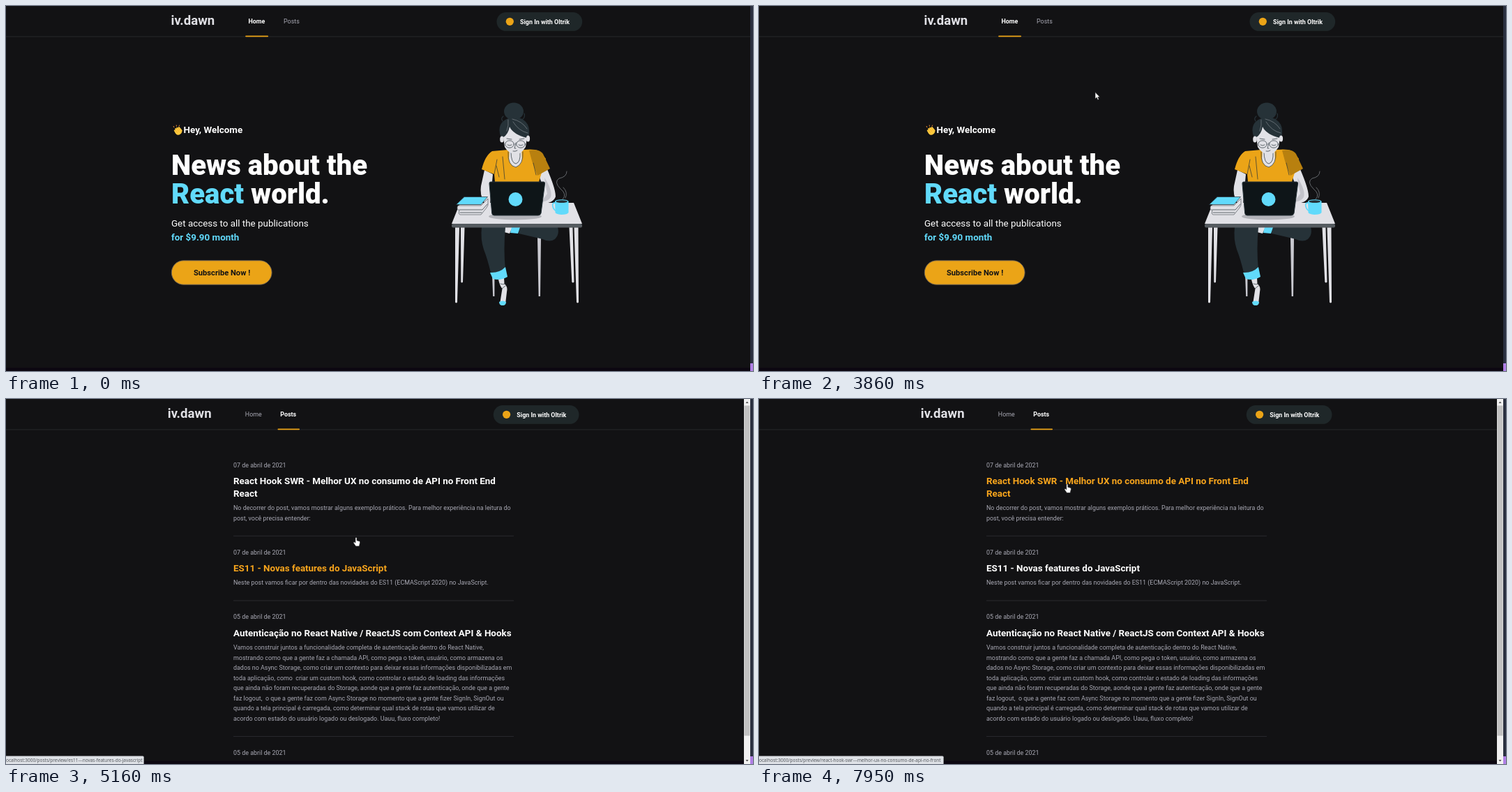
Write an HTML page that moves like this. It is 1071 by 523 pixels and loops after 8000 ms.

```html
<!DOCTYPE html>
<html lang="en">
<head>
<meta charset="utf-8">
<style>
  html, body { margin: 0; width: 100%; height: 100%; overflow: hidden; background: #121214; }
  svg { display: block; width: 1071px; height: 523px; }
  text { font: 8.92px Roboto, sans-serif; fill: #a8a8b3; white-space: pre; }
  .b { font-weight: 700; fill: #fff; }
  .brand { font-size: 18.6px; fill: #e1e1e6; }
  .mid { font-size: 13.4px; }
  .h1 { font-size: 40.15px; font-weight: 900; }
  .cyan { fill: #61dafb; }
  .url { font: 6.5px "Open Sans", sans-serif; fill: #4d5156; }
  .dark { fill: #263238; }
  .skin { fill: #e1e1e6; }
  .gold { fill: #eba417; }
  .line { fill: none; stroke: #263238; stroke-width: .7; stroke-linecap: round; }
</style>
</head>
<body>
<svg id="stage" viewBox="0 0 1071 523"></svg>
<script>
const text = (x, y, s, cls = '', id = '') =>
  `<text x="${x}" y="${y}" class="${cls}" id="${id}">${s}</text>`;
const path = (d, cls, extra = '') => `<path d="${d}" class="${cls}" ${extra}/>`;
const rect = (x, y, w, h, fill, r = 0) =>
  `<rect x="${x}" y="${y}" width="${w}" height="${h}" fill="${fill}" rx="${r}"/>`;
const oval = (x, y, rx, ry, cls, extra = '') =>
  `<ellipse cx="${x}" cy="${y}" rx="${rx}" ry="${ry}" class="${cls}" ${extra}/>`;

// Site header; dx is the shift caused by the scrollbar
const header = (dx, onPosts) => `
  ${rect(0, 43.5, 1067, .8, '#2b2c30')}
  <g transform="translate(${dx})">
    ${text(236.5, 27, 'iv.dawn', 'b brand')}
    ${text(347.5, 25.2, 'Home', onPosts ? '' : 'b')}
    ${text(398, 25.2, 'Posts', onPosts ? 'b' : '', onPosts ? '' : 'postsLink')}
    ${onPosts ? rect(394.2, 42.4, 31.5, 1.8, '#eba417', .8) : rect(343.2, 42.4, 32.8, 1.8, '#eba417', .8)}
    ${rect(703.5, 9, 122.7, 26.8, '#1f2729', 13.4)}
    ${oval(722.3, 22.3, 5.6, 5.6, 'gold')}
    ${text(737, 25.6, 'Sign In with Oltrik', 'b')}
  </g>`;

const clap = `
  <g transform="translate(246.3 178.8) rotate(-38)" fill="#ffc83d">
    <rect x="-4.8" y="-3.6" width="10" height="9.6" rx="4.4"/>
    ${[-4.4, -1.9, .6, 3.1].map((x, i) => rect(x, -5.4 + Math.abs(i - 1.4), 2.2, 8, '#ffc83d', 1.1)).join('')}
    <path d="M-2-2V2M.6-2.6V2M3-2V2" stroke="#e59a1c" stroke-width=".5"/>
  </g>
  <path d="M241 174l-1-2M244.5 172.5l-.3-2M248 172.4l.8-1.8" stroke="#f28b30" stroke-width="1"/>`;

const woman = `
  ${path('M762 332h5l-1 84h-2.4ZM697 384h3.4v32h-2.2Z', '', 'fill="#c9c9d0"')}
  ${path('M735 317H791Q794 327 787 334Q780 339 769 334L735 326Z', 'dark')}
  ${path('M714 317H726L722 326L714 324Z', 'skin')}
  ${path('M725 317H737L734 326L723 325Z', 'cyan')}
  ${path('M682 317H716Q713 348 716 378L696 386Q690 361 685 349Q680 334 682 317Z', 'dark')}
  ${path('M706 392L714 389L714.5 398Q720 402 718 410L716 427Q712 431 708 427L711.5 405Q708 401 706 392Z', 'skin')}
  ${path('M707 424Q712 421 717 424Q717 429 712 429Q707 429 707 424Z', 'cyan')}
  ${path('M709 398Q714 400 717 397M711 405L716 401', 'line')}
  ${path('M694 382Q707 383 716 374L719 388Q709 394 698 391Z', 'cyan')}
  ${path('M686 235L698 241L694 284H688Q679 275 681 258Z', 'skin')}
  ${path('M763 240L776 234Q788 262 788 273Q785 283 768 283L771 262Z', 'skin')}
  ${path('M772 246Q784 264 781 274Q776 281 768 280L776 269Z', '', 'fill="#c3c3ca"')}
  ${path('M720 206L742 206Q762 204 767 210L774 219L764 252H701L700 241L682 234Q687 214 697 208Z', 'gold')}
  ${path('M750 207Q765 204 770 212L780 233L762 243L754 222Z', '', 'fill="#b8800f"')}
  ${path('M700 241L704 220M707 245L703 229M760 242L756 225M712 216L715 248', 'line')}
  ${path('M722 204H739L740 221Q737 230 730 231Q724 229 721 221Z', 'skin')}
  ${path('M720 209Q719 229 731 231Q742 227 741 209M724 209Q724 225 731 226Q738 224 737 210', 'line')}
  ${oval(728, 151, 14, 12.5, 'dark')}
  ${path('M708 183Q704 163 728 159Q752 161 750 184L747 193L711 192Z', 'dark')}
  ${oval(711, 191, 2.8, 4.5, 'skin')}${oval(748.5, 190, 2.6, 4.5, 'skin')}
  ${path('M713 188Q720 184 722 173Q727 184 747 189L745 202Q738 213 731 213Q720 211 715 202Z', 'skin')}
  ${path('M718 179Q721 171 720 163M727 166Q735 179 748 182M726 162Q740 165 747 176', 'line', 'style="stroke:#9ea5aa;stroke-width:.5"')}
  ${path('M712 165Q709 161 713 158M740 163Q745 159 743 154', 'line', 'style="stroke-width:1.2"')}
  ${oval(722, 198, 6.3, 5.2, 'line')}${oval(738, 198, 6.3, 5.2, 'line')}
  ${path('M719 199Q722 201 725 199M735 199Q738 201 741 199M718 190L725 191M736 191L743 190M731 196L729 204H731M727 208Q730 209 733 207', 'line')}
  ${path('M651 282H814L826 312H639Z', 'skin')}
  ${rect(639, 312, 187, 5.4, '#555b60', 2)}
  ${path('M644 317.5h6l-3 107q-1.5 2-3 0ZM652 317.5h5.5l-2.5 78q-1.5 2-2.7 0ZM807.5 317.5h5l2 78q-1.8 2-3.2 0ZM814.5 317.5h6l.5 107q-1.5 2-3 0Z', 'skin')}
  ${oval(730, 301.5, 38, 5, '', 'fill="#b3b4ba"')}
  ${path('M695 252H771Q773 252 772.5 255L767 297Q766 300 763 300H700Q697 300 696.7 297L693 255Q692.5 252 695 252Z', '', 'fill="#0e1518" stroke="#263238" stroke-width="1"')}
  ${oval(730.5, 277, 10, 10, 'cyan')}
  ${path('M648 286H681L691 276V285L689 289L681 299H651Q648 298 650 293Q645 291 648 286Z', 'skin', 'stroke="#555b60" stroke-width=".7"')}
  ${path('M650 292H683L690 284M651 296H682', 'line')}
  ${path('M657 273.5H690.5L681 284.5H645.5Z', 'cyan', 'stroke="#263238" stroke-width=".7"')}
  ${path('M787 282Q782 282 784.5 289Q786 293 790 294', 'line', 'style="stroke:#61dafb;stroke-width:1.8"')}
  ${path('M787 280H806.5V296Q805 299 796 299Q788 298 787.5 296Z', 'cyan')}
  ${oval(796.7, 280, 9.8, 2.8, 'cyan')}${oval(796.7, 280.2, 8.2, 1.9, 'dark')}
  ${path('M798 277Q805 270 795 262Q785 252 793 247Q804 245 804 237M802 275Q806 267 799 260', 'line', 'style="stroke:#878b90"')}`;

const home = `
  ${header(0, false)}
  ${clap}
  ${text(254.6, 182.4, 'Hey, Welcome', 'b mid')}
  ${text(237, 242.3, 'News about the', 'b h1')}
  ${text(237, 282.5, '<tspan class="cyan">React</tspan> world.', 'b h1')}
  ${text(237, 316.4, 'Get access to all the publications', 'mid" style="fill:#fff')}
  ${text(237, 336.4, 'for $9.90 month', 'b mid cyan')}
  <rect x="237.3" y="364.8" width="143.8" height="34.4" rx="17.2" fill="#eba417" stroke="#6b6256" stroke-width=".9"/>
  ${text(269, 386.3, 'Subscribe Now !', 'b" style="font-size:11.15px;fill:#121214')}
  ${woman}`;

const para = (y, lines) => lines.map((s, i) => text(326, y + i * 14.5, s)).join('');
const rule = y => rect(326, y, 402, .7, '#323238');
const posts = `
  ${header(-4.7, true)}
  ${text(326, 97.6, '07 de abril de 2021')}
  <g id="swr">
    ${text(326, 122.2, 'React Hook SWR - Melhor UX no consumo de API no Front End', 'b mid" style="fill:inherit')}
    ${text(326, 140, 'React', 'b mid" style="fill:inherit')}
  </g>
  ${para(159.2, ['No decorrer do post, vamos mostrar alguns exemplos práticos. Para melhor experiência na leitura do',
    'post, você precisa entender:'])}
  ${rule(195.8)}
  ${text(326, 222.6, '07 de abril de 2021')}
  <g id="es11">${text(326, 247.2, 'ES11 - Novas features do JavaScript', 'b mid" style="fill:inherit')}</g>
  ${para(266.2, ['Neste post vamos ficar por dentro das novidades do ES11 (ECMAScript 2020) no JavaScript.'])}
  ${rule(288.6)}
  ${text(326, 315.4, '05 de abril de 2021')}
  ${text(326, 340, 'Autenticação no React Native / ReactJS com Context API &amp; Hooks', 'b mid')}
  ${para(359, ['Vamos construir juntos a funcionalidade completa de autenticação dentro do React Native,',
    'mostrando como que a gente faz a chamada API, como pega o token, usuário, como armazena os',
    'dados no Async Storage, como criar um contexto para deixar essas informações disponibilizadas em',
    'toda aplicação, como  criar um custom hook, como controlar o estado de loading das informações',
    'que ainda não foram recuperadas do Storage, aonde que a gente faz autenticação, onde que a gente',
    'faz logout,  o que a gente faz com Async Storage no momento que a gente fizer SignIn, SignOut ou',
    'quando a tela principal é carregada, como determinar qual stack de rotas que vamos utilizar de',
    'acordo com estado do usuário logado ou deslogado. Uauu, fluxo completo!'])}
  ${rule(483)}
  ${text(326, 509.6, '05 de abril de 2021')}
  ${rect(1058, 0, 9, 523, '#f1f1f1')}
  ${rect(1058.5, 9.5, 8, 473, '#c1c1c1')}
  ${path('M1060.5 6l2-2.5 2 2.5ZM1060.5 517l2 2.5 2-2.5Z', '', 'fill="#505050"')}`;

document.getElementById('stage').innerHTML = `
  ${rect(0, 0, 1071, 523, '#121214')}
  ${rect(0, 518.5, 1067, 5, '#0c0711')}
  <g id="home">${home}</g>
  <g id="posts">${posts}</g>
  ${rect(1067, 0, 4, 523, '#2a3040')}
  ${rect(1067, 512, 4, 11, '#b07fe6')}
  <g id="status"><rect id="statusBox" x="-2" y="511.7" height="12" rx="1.5" fill="#dee1e6" stroke="#a9abb0" stroke-width=".5"/>${text(0, 519.7, '', 'url', 'url')}</g>
  ${path('M370.2 16.8h2.4M371.4 16.8v9.8M370.2 26.6h2.4', '', 'id="ibeam" stroke="#ddd" stroke-width=".7"')}
  <g id="cursor" stroke="#1a1a1c" stroke-width=".6">
    ${path('M0 0V9.5L2.2 7.6 3.7 11 5.3 10.3 3.8 7H6.7Z', '', 'id="arrow" fill="#fff"')}
    ${path('M-1.2 1Q-.2-.4.9 1V4.8L4.6 5.8Q5.7 6.3 5.4 8L4.2 13H-.6L-3.9 8.4Q-4.2 7-2.9 6.9L-1.2 8.2Z', '', 'id="hand" fill="#fff"')}
  </g>`;

const $ = id => document.getElementById(id);
const show = (id, on) => $(id).style.display = on ? '' : 'none';
const clamp = v => Math.max(0, Math.min(1, v));

// Pointer tip: time, x, y
const track = [
  [130, 932, 402], [420, 860, 240], [700, 770, 70], [900, 722, 20], [1130, 737, 25],
  [1830, 737, 25], [2000, 803, 26], [2200, 600, 25], [2380, 300, 22], [2540, 360, 20],
  [2690, 405.5, 23], [2900, 407, 23], [3080, 440, 50], [3230, 518, 100], [3460, 482, 123.5],
  [4160, 482, 123.5], [4390, 484, 196], [4550, 477, 240], [4780, 443, 228],
  [5010, 470, 225], [5160, 502, 198], [5260, 516, 190], [5400, 474, 106], [5580, 448, 196],
  [5700, 440, 226], [5840, 436, 196], [6090, 425, 121.5], [6790, 424, 120], [6940, 425, 121.5],
  [7170, 425, 121.5], [7330, 420, 121.5], [7630, 420, 121.5], [7710, 423, 121.5],
  [7860, 432, 121.5], [7950, 442, 121.5]
];
const swaps = [[4200, 'swr'], [4390, 'es11'], [5260, 'swr'], [5580, 'es11'], [5840, 'swr']];
const slugs = { swr: 'react-hook-swr---melhor-ux-no-consumo-de-api-no-front', es11: 'es11---novas-features-do-javascript' };
const PAGE_AT = 4160;

function pointer(t) {
  const i = track.findIndex(k => k[0] > t);
  if (i < 0) return track.at(-1).slice(1);
  const [a, b] = [track[Math.max(0, i - 1)], track[i]];
  const u = clamp((t - a[0]) / (b[0] - a[0] || 1));
  return [a[1] + (b[1] - a[1]) * u, a[2] + (b[2] - a[2]) * u];
}

const tint = u => `rgb(${[[255, 248], [255, 165], [255, 28]].map(([a, b]) => a + (b - a) * u)})`;

function draw(t) {
  const onPosts = t >= PAGE_AT;
  show('home', !onPosts);
  show('posts', onPosts);

  const [x, y] = pointer(t);
  const overPosts = x > 392 && x < 426 && y < 40;
  const overLink = onPosts ? y > 86 && x > 326 && x < 728
    : overPosts || (y < 36 && (x > 704 && x < 826 || x > 343 && x < 376));
  show('cursor', t >= 130);
  show('hand', overLink);
  show('arrow', !overLink);
  show('ibeam', t >= 2600 && t < 2770);
  $('cursor').setAttribute('transform', `translate(${x} ${y})`);
  $('postsLink').style.fill = overPosts ? '#fff' : '';

  // Link colours fade over 200 ms
  const now = swaps.filter(s => s[0] <= t).at(-1);
  const fade = now ? clamp((t - now[0]) / 200) : 0;
  for (const id of ['swr', 'es11']) {
    const used = swaps.some(s => s[0] <= t && s[1] === id);
    $(id).style.fill = tint(!used ? 0 : now[1] === id ? fade : 1 - fade);
  }

  const seen = swaps.filter(s => s[0] + 40 <= t).at(-1);
  const tail = onPosts ? seen && '/preview/' + slugs[seen[1]] : t >= 2770 && t < 3150 && '';
  show('status', typeof tail === 'string');
  if (typeof tail === 'string') {
    $('url').textContent = 'ocalhost:3000/posts' + tail;
    $('statusBox').setAttribute('width', !tail ? 66 : seen[1] === 'swr' ? 266.5 : 199.5);
  }
}

const start = performance.now();
function tick() {
  draw((performance.now() - start) % 8000);
  requestAnimationFrame(tick);
}
tick();
</script>
</body>
</html>
```
